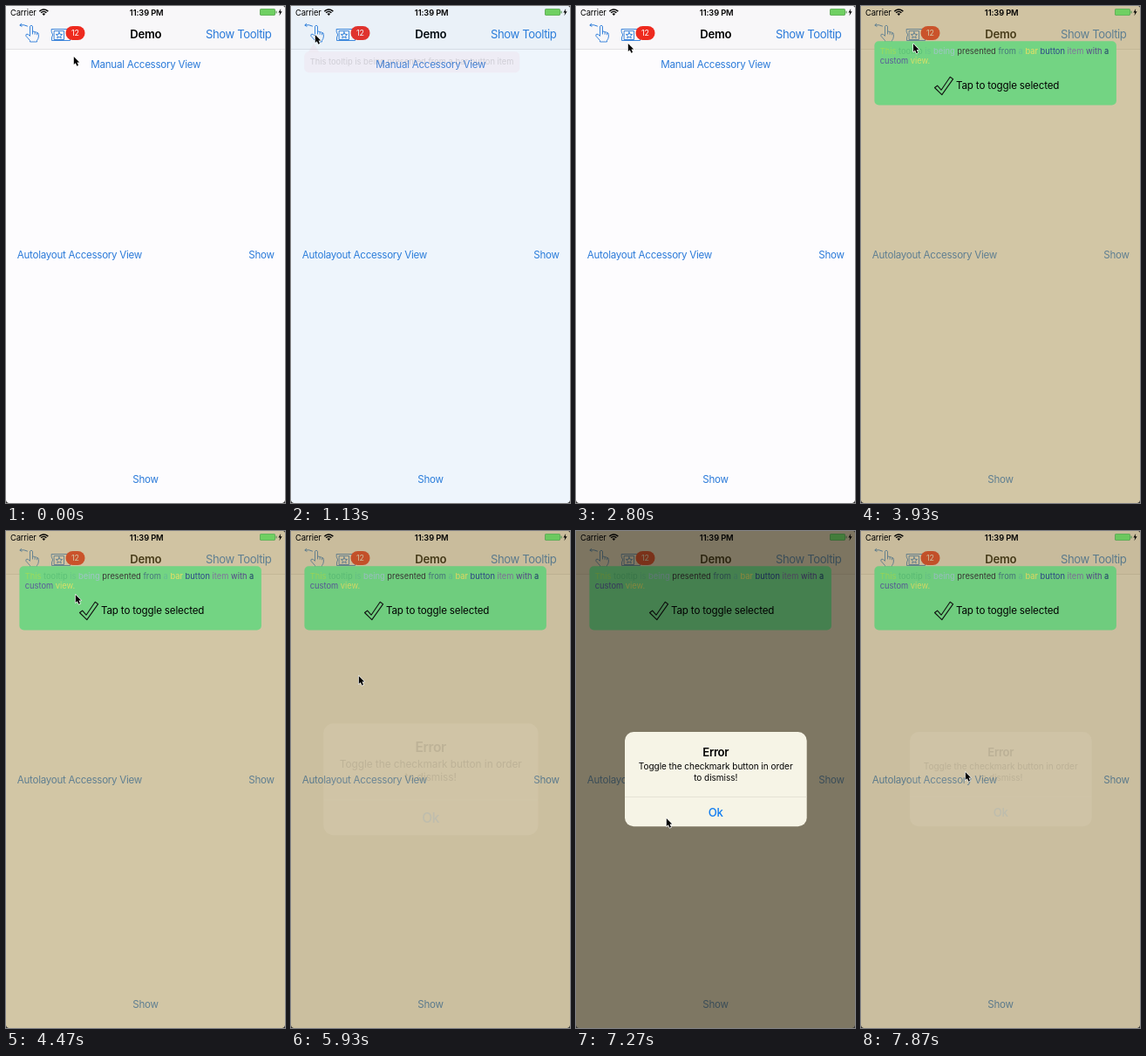
Recreate the animation shown at these times as an HTML page with a canvas. Size 320x569 px, loop 8000 ms.

```html
<!DOCTYPE html>
<html lang="en">
<head>
<meta charset="utf-8">
<title>Tooltip demo</title>
<style>
  html, body { margin: 0; width: 100%; height: 100%; overflow: hidden; background: #fdfcfe; }
  canvas { display: block; width: 320px; height: 569px; }
</style>
</head>
<body>
<canvas id="stage"></canvas>
<script>
const W = 320, H = 569, LOOP = 8000, LAST = 7870;
const PT = W / 414;
const BLUE = '#2a7ad9';
const canvas = document.getElementById('stage');
const ctx = canvas.getContext('2d');
const ratio = window.devicePixelRatio || 1;
canvas.width = W * ratio;
canvas.height = H * ratio;

// Pointer stops: time, x, y
const POINTER = [
  [0, 77, 57], [150, 77, 57], [800, 27, 32], [1250, 27, 32],
  [1750, 60, 108], [2200, 60, 108], [2720, 59, 42], [3900, 59, 42],
  [4400, 79, 72], [4900, 79, 72], [5500, 77, 165], [6400, 77, 165],
  [7100, 103, 328], [7530, 103, 328], [7870, 119, 275]
];

const WORDS = [
  ['This', '#9ddb5a'], ['tooltip', '#5cc077'], ['is', '#68c48a'], ['being', '#9fc4c6'],
  ['presented', '#3b3836'], ['from', '#46757c'], ['a', '#66bd92'], ['bar', '#eadf62'],
  ['button', '#2c4688'], ['item', '#80739c'], ['with', '#57468a'], ['a', '#1b3b68']
];
const WORDS_2 = [['custom', '#59589a'], ['view.', '#d9df68']];

const clamp = v => Math.max(0, Math.min(1, v));
const smooth = v => { v = clamp(v); return v * v * (3 - 2 * v); };
const ramp = (t, start, length) => smooth((t - start) / length);
const settle = (t, start) => {
  const x = Math.max(0, t - start) * 0.011;
  return 1 - (1 + x) * Math.exp(-x);
};

function withAlpha(alpha, draw) {
  if (alpha <= 0.002) return;
  ctx.save();
  ctx.globalAlpha *= alpha;
  draw();
  ctx.restore();
}

function text(str, x, y, points, color, { align = 'left', weight = 400, track = 0 } = {}) {
  const size = points * PT;
  ctx.font = `${weight} ${size}px Inter, sans-serif`;
  ctx.letterSpacing = `${track * size}px`;
  ctx.textAlign = align;
  ctx.textBaseline = 'alphabetic';
  ctx.fillStyle = color;
  ctx.fillText(str, x, y);
  return ctx.measureText(str).width;
}

function box(x, y, w, h, r, color) {
  ctx.fillStyle = color;
  ctx.beginPath();
  ctx.roundRect(x, y, w, h, r);
  ctx.fill();
}

function fillAll(color) {
  ctx.fillStyle = color;
  ctx.fillRect(0, 0, W, H);
}

function stroke(path, color, width = 1) {
  ctx.strokeStyle = color;
  ctx.lineWidth = width;
  ctx.lineJoin = ctx.lineCap = 'round';
  ctx.stroke(new Path2D(path));
}

function fill(path, color) {
  ctx.fillStyle = color;
  ctx.fill(new Path2D(path));
}

function starPath(cx, cy, outer, inner) {
  let d = '';
  for (let i = 0; i < 10; i++) {
    const a = -Math.PI / 2 + i * Math.PI / 5, r = i % 2 ? inner : outer;
    d += `${i ? 'L' : 'M'}${cx + r * Math.cos(a)} ${cy + r * Math.sin(a)}`;
  }
  return d + 'Z';
}

function navIcons() {
  stroke('M16 22Q20.5 20.8 24.5 23M17.6 20.2L16 22L18 23.3', BLUE);
  stroke('M27.5 34V23.2Q29 21 30.5 23.2V29.5Q32 28.2 33.2 30Q34.8 29 35.6 30.8Q37.4 30.2 37.4 32.5'
    + 'V35Q37 38 35.5 39.5V41H27.5V39.5L22.8 34.2Q22.4 31.5 24.8 32.2Z'
    + 'M30.5 29.5V32M33.2 30V32.3M35.6 30.8V32.8', BLUE, 0.9);
  stroke('M52.5 26.5H73.5V30Q71 33 73.5 36V39.5H52.5V36Q55 33 52.5 30Z'
    + 'M55.5 28.5H66.5V38.5H55.5Z', BLUE, 0.9);
  stroke(starPath(61, 33.7, 3.8, 1.7), BLUE, 0.9);
  box(68.5, 23, 22, 16, 8, '#ee2a1f');
  text('12', 79.5, 34, 11.5, '#fff', { align: 'center' });
}

function screen() {
  fillAll('#fdfcfe');
  ctx.fillStyle = '#f8f7f9';
  ctx.fillRect(0, 0, W, 49);
  ctx.fillStyle = '#c6c5c8';
  ctx.fillRect(0, 49, W, 0.5);
  navIcons();
  text('Demo', 160.2, 36.6, 17, '#000', { align: 'center', weight: 600, track: -0.025 });
  text('Show Tooltip', 304.5, 36.6, 17, BLUE, { align: 'right', track: -0.03 });
  const link = (str, x, y, align) => text(str, x, y, 15, BLUE, { align, track: -0.023 });
  link('Manual Accessory View', 160.3, 71, 'center');
  link('Autolayout Accessory View', 12.8, 288.5, 'left');
  link('Show', 307.7, 288.5, 'right');
  link('Show', 160, 546.3, 'center');
}

function statusBar() {
  text('Carrier', 5, 10.7, 12, '#000', { track: -0.01 });
  text('11:39 PM', 161.2, 10.7, 12, '#000', { align: 'center', weight: 600, track: -0.01 });
  ctx.strokeStyle = '#000';
  ctx.lineCap = 'butt';
  ctx.lineWidth = 1.4;
  for (const r of [6.6, 4.2]) {
    ctx.beginPath();
    ctx.arc(43.3, 10.6, r, -Math.PI * 0.77, -Math.PI * 0.23);
    ctx.stroke();
  }
  fill('M43.3 11L41.5 8.9Q43.3 7.5 45.1 8.9Z', '#000');
  box(291, 3, 18, 8, 1.8, '#5b9c56');
  box(291.6, 3.6, 16.8, 6.8, 1.3, '#6fd062');
  box(309.5, 5.5, 1.2, 3, 0.6, '#5b9c56');
  fill('M315.2 3L312.4 7.6H314.3L313.4 11.2L316.6 6.3H314.6Z', '#000');
}

function pinkTooltip() {
  box(15.4, 52.2, 246.8, 24, 5, '#f0b0c4');
  fill('M20 52.6L26 43L32 52.6Z', '#f0b0c4');
  text('This tooltip is being presented from a bar button item', 21.7, 67.3, 12, '#111', { track: 0.003 });
}

function colorLine(words, x, y) {
  for (const [word, color] of words) x += text(word + ' ', x, y, 12, color, { track: 0.003 });
}

function greenTooltip() {
  box(15.4, 40.3, 277.5, 73.2, 5, '#73d483');
  colorLine(WORDS, 21.7, 55.4);
  colorLine(WORDS_2, 21.7, 66.3);
  stroke('M84.5 93.5L87.6 91.2L92 96.2L102.2 81.3L105.6 83.6L92.8 101.6Z', '#111', 1.1);
  text('Tap to toggle selected', 109, 95.4, 15, '#000', { track: -0.013 });
}

function alertBox(scale) {
  ctx.translate(160.3, 284);
  ctx.scale(scale, scale);
  ctx.translate(-160.3, -284);
  box(56, 230, 208.7, 108.3, 10, '#f6f4e6');
  const centered = (str, y, size, color, weight, track) =>
    text(str, 160.2, y, size, color, { align: 'center', weight, track });
  centered('Error', 258, 17, '#000', 600, -0.025);
  centered('Toggle the checkmark button in order', 273, 13, '#000', 400, -0.004);
  centered('to dismiss!', 285.7, 13, '#000', 400, -0.004);
  ctx.fillStyle = '#dad7ca';
  ctx.fillRect(56, 304, 208.7, 0.6);
  centered('Ok', 326.7, 17, '#117df0', 500, -0.02);
}

function pointerAt(t) {
  let i = 1;
  while (i < POINTER.length - 1 && POINTER[i][0] < t) i++;
  const [t0, x0, y0] = POINTER[i - 1], [t1, x1, y1] = POINTER[i];
  const k = ramp(t, t0, t1 - t0);
  return [x0 + (x1 - x0) * k, y0 + (y1 - y0) * k];
}

function pointer(t) {
  const [x, y] = pointerAt(t);
  ctx.save();
  ctx.translate(x + 0.3, y + 0.4);
  const arrow = 'M0.5 0.5V9.6L2.5 7.8L4.1 11.4L5.7 10.7L4.2 7.2H6.9Z';
  stroke(arrow, '#fff', 1.3);
  fill(arrow, '#000');
  ctx.restore();
}

function corners() {
  fill('M0 566V569H3Q0.4 568.6 0 566ZM320 566V569H317Q319.6 568.6 320 566ZM320 2V0H318Q319.7 0.3 320 2Z', '#333');
}

function render(t) {
  const pink = ramp(t, 1050, 350) * (1 - ramp(t, 2080, 350));
  const green = ramp(t, 3560, 350);
  const leaving = settle(t, 7510);
  const entering = settle(t, 5885);
  const alert = entering * (1 - leaving);

  ctx.setTransform(ratio, 0, 0, ratio, 0, 0);
  screen();
  withAlpha(pink * 0.54, () => fillAll('rgb(52,156,228)'));
  withAlpha(green * 0.455, () => fillAll('rgb(159,132,59)'));
  statusBar();
  withAlpha(pink, pinkTooltip);
  withAlpha(green, greenTooltip);
  withAlpha(alert * 0.4, () => fillAll('#000'));
  withAlpha(alert, () => alertBox(1.2 - 0.2 * entering));
  corners();
  pointer(t);
}

const begin = performance.now();
function tick() {
  render(Math.min((performance.now() - begin) % LOOP, LAST));
  requestAnimationFrame(tick);
}
tick();
</script>
</body>
</html>
```
